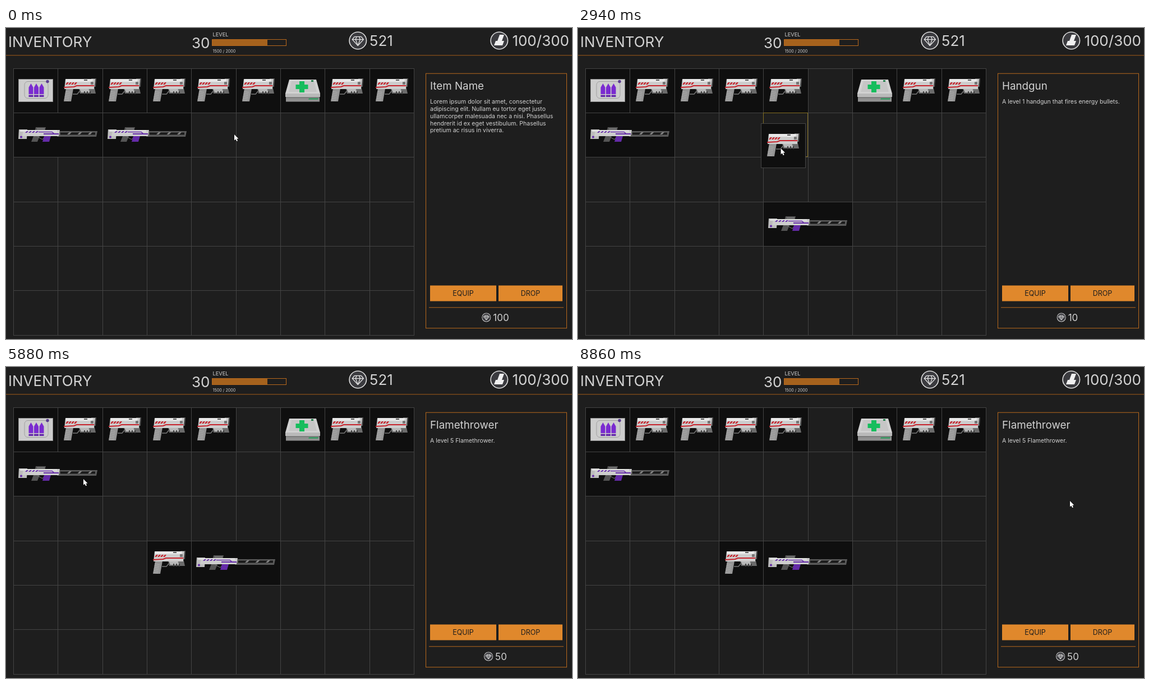
An HTML page with a canvas for the animation above (9.59 s loop, 1009x555 px).

```html
<!DOCTYPE html>
<html lang="en">
<head>
<meta charset="utf-8">
<title>Inventory</title>
<style>
html, body { margin: 0; width: 100%; height: 100%; overflow: hidden; background: #1e1e1e; }
canvas { display: block; width: 1009px; height: 555px; }
</style>
</head>
<body>
<canvas id="stage" width="1009" height="555"></canvas>
<script>
const ctx = document.getElementById('stage').getContext('2d');
const LOOP = 9590, CELL = 79.33, LEFT = 13, TOP = 71.7, COLS = 9, ROWS = 6;
const DRAG_LAG = 12;
const BG = '#1e1e1e', LINE = '#444444', TEXT = '#d2d2d2', ORANGE = '#e0882c', RIM = '#b8691c';
const RED = '#c6232c', PURPLE = '#642ba8', METAL = '#cdcdcd', DARK = '#555555';
const colX = c => Math.round(LEFT + c * CELL);
const rowY = r => Math.round(TOP + r * CELL);

// Each pointer move eases out (power) to a point along a bowed line.
const origin = { x: 407, y: 190 };
const moves = [
  { from: 10, to: 240, x: 266, y: 194, bow: 8, power: 1.5 },
  { from: 1070, to: 1700, x: 407, y: 347, bow: 23, power: 2 },
  { from: 2200, to: 2500, x: 449, y: 118, bow: 0, power: 2 },
  { from: 2740, to: 3300, x: 291, y: 333, bow: 13, power: 1.5 },
  { from: 3680, to: 4150, x: 129, y: 196, bow: 0, power: 2 },
  { from: 4340, to: 5240, x: 244, y: 344, bow: 44, power: 1.7 },
  { from: 5640, to: 5880, x: 138, y: 200, bow: 0, power: 2 },
  { from: 6090, to: 6890, x: 877, y: 239, bow: 60, power: 1.33 }
];

const items = [
  { art: ammo, col: 0, row: 0 },
  ...[1, 2, 3, 4, 7, 8].map(col => ({ art: handgun, col, row: 0 })),
  { art: medkit, col: 6, row: 0 },
  { art: handgun, col: 5, row: 0, drags: [{ from: 2750, to: 3530, col: 3, row: 3 }] },
  { art: rifle, col: 2, row: 1, span: 2, drags: [{ from: 1100, to: 2000, col: 4, row: 3 }] },
  { art: rifle, col: 0, row: 1, span: 2, drags: [
    { from: 4370, to: 5440, col: 0, row: 1 }, { from: 6110, to: 7120, col: 0, row: 1 }] }
];

const flamethrower = { name: 'Flamethrower', lines: ['A level 5 Flamethrower.'], price: '50' };
const details = [
  { at: 0, name: 'Item Name', price: '100', lines: [
    'Lorem ipsum dolor sit amet, consectetur', 'adipiscing elit. Nullam eu tortor eget justo',
    'ullamcorper malesuada nec a nisi. Phasellus', 'hendrerit id ex eget vestibulum. Phasellus',
    'pretium ac risus in viverra.'] },
  { at: 900, ...flamethrower },
  { at: 2600, name: 'Handgun', lines: ['A level 1 handgun that fires energy bullets.'], price: '10' },
  { at: 4320, ...flamethrower }
];

function pointer(t) {
  const next = moves.findIndex(m => t < m.to);
  if (next < 0) return moves[moves.length - 1];
  const start = moves[next - 1] || origin, move = moves[next];
  const u = Math.max(0, (t - move.from) / (move.to - move.from));
  const e = 1 - (1 - u) ** move.power;
  const dx = move.x - start.x, dy = move.y - start.y;
  const side = move.bow * Math.sin(Math.PI * e) / Math.hypot(dx, dy);
  return { x: start.x + dx * e - dy * side, y: start.y + dy * e + dx * side };
}

function rect(color, x, y, w, h) { ctx.fillStyle = color; ctx.fillRect(x, y, w, h); }

function frame(color, x, y, w, h) {
  ctx.strokeStyle = color;
  ctx.lineWidth = 1;
  ctx.strokeRect(x + .5, y + .5, w, h);
}

function trace(pts) {
  ctx.beginPath();
  for (let i = 0; i < pts.length; i += 2) ctx.lineTo(pts[i], pts[i + 1]);
}

function poly(color, ...pts) { trace(pts); ctx.fillStyle = color; ctx.fill(); }

function stroke(color, width, ...pts) {
  trace(pts);
  ctx.strokeStyle = color;
  ctx.lineWidth = width;
  ctx.stroke();
}

// Parallelogram whose top edge is shifted sideways by lean
function slab(color, x, y, w, h, lean) {
  poly(color, x + lean, y, x + lean + w, y, x + w, y + h, x, y + h);
}

function disc(color, x, y, r) {
  ctx.beginPath();
  ctx.arc(x, y, r, 0, Math.PI * 2);
  ctx.fillStyle = color;
  ctx.fill();
}

function text(str, x, y, size, color = TEXT, align = 'left') {
  ctx.font = `${size}px Inter, sans-serif`;
  ctx.fillStyle = color;
  ctx.textAlign = align;
  ctx.fillText(str, x, y);
}

function ammo() {
  rect(METAL, 9, 20, 62, 40);
  frame('#8d8d8d', 9, 19, 61, 40);
  ctx.beginPath();
  ctx.roundRect(20, 23.5, 42, 30, 6);
  ctx.strokeStyle = '#a0a0a0';
  ctx.stroke();
  disc('#5b3a91', 61, 23.5, 2.7);
  for (let i = 0; i < 3; i++) {
    const x = 27.5 + i * 9.5;
    poly('#7a2bd0', x, 46, x, 34, x + 4, 27, x + 8, 34, x + 8, 46);
    rect('#6427ab', x, 47.5, 8, 3.5);
  }
}

function handgun() {
  slab('#959595', 11, 36, 13, 23, 4);
  for (let i = 0; i < 6; i++) stroke('#adadad', 1, 14 - i / 2, 41 + i * 3, 23 - i / 2, 43 + i * 3);
  stroke('#777777', 1.5, 27, 46, 35, 46, 39, 41);
  slab('#6b6b6b', 40, 36, 28, 9, -2);
  slab('#b8b8b8', 42, 36, 16, 7, -3);
  for (let i = 0; i < 3; i++) rect('#3d3d3d', 47 + i * 5, 41, 2, 5);
  slab(DARK, 59, 18, 9, 15, 1);
  slab(METAL, 12, 19, 53, 18, 2);
  slab('#e8e8e8', 14, 19, 48, 5, 1);
  rect(DARK, 47, 20, 6, 2);
  rect('#777777', 59, 24, 5, 5);
  stroke(RED, 2.2, 11, 34, 29, 33, 34, 31, 65, 31);
  for (let i = 0; i < 4; i++) slab(RED, 14 + i * 5, 25, 3, 4, 3);
}

function medkit() {
  slab('#919191', 10, 44, 60, 15.5, 0);
  slab('#b9b9b9', 9, 44, 62, 7, 0);
  poly('#d2d2d2', 16, 20, 64, 20, 71, 45, 9, 45);
  poly('#c6c6c6', 20, 23, 60, 23, 65, 42, 15, 42);
  rect('#6c6c6c', 10, 52, 60, 1);
  rect('#17bd5d', 27.5, 29, 22, 8);
  rect('#17bd5d', 34, 23, 9, 20);
  rect('#237f4b', 55, 21, 4, 3);
  slab('#239e58', 50, 53.5, 17, 2, 1);
}

function rifle() {
  slab(DARK, 38, 26, 18, 8, 2);
  rect('#777777', 42, 28, 14, 2);
  slab(DARK, 32, 42, 11, 10, 4);
  stroke('#777777', 1, 43, 43, 52, 48, 56, 43);
  slab(PURPLE, 52, 42, 12, 10, 3);
  slab('#5a5a5a', 78, 33, 70, 10, 2);
  rect('#191919', 84, 35.5, 62, 4);
  for (let i = 0; i < 3; i++) slab('#858585', 96 + i * 18.5, 35, 4, 4, 4);
  slab('#bdbdbd', 9, 30, 15, 17, 1);
  slab(METAL, 16, 31, 65, 11, 2);
  slab('#e0e0e0', 12, 31, 66, 3, 0);
  rect(PURPLE, 54, 37, 27, 2);
  for (let i = 0; i < 4; i++) slab(PURPLE, 21 + i * 6, 33, 3, 3, 3);
  stroke(PURPLE, 1.6, 45, 34.5, 69, 34.5, 73, 38);
  disc(PURPLE, 14, 43.5, 2);
}

function badge(x, y, r) {
  disc('#e2e2e2', x, y, r);
  disc('#3b3b3f', x, y, r * .9);
}

function gem(x, y, r) {
  const width = r < 10 ? 1.8 : 1.3;
  ctx.save();
  ctx.translate(x, y);
  ctx.scale(r / 16, r / 16);
  badge(0, 0, 16);
  for (const edge of [-10, -4, 4, 10]) stroke('#e4e4e4', width, edge * .6, -7, edge, -2, 0, 9);
  stroke('#e4e4e4', width, -6, -7, 6, -7);
  stroke('#e4e4e4', width, -10, -2, 10, -2);
  ctx.restore();
}

function header() {
  text('INVENTORY', 4, 33.5, 26);
  text('30', 331, 36, 26);
  text('LEVEL', 368.5, 15.3, 9.3);
  rect('#a5621d', 367, 21, 99, 11);
  frame(RIM, 367, 20, 132, 11);
  text('1500 / 2000', 368.5, 43.5, 7.2);
  gem(627.3, 22.5, 16);
  text('521', 648, 32, 26);
  badge(879.3, 22.5, 16);
  slab('#f0f0f0', 876, 12, 8, 11, 4);
  slab('#f0f0f0', 870, 23, 15, 8, 3);
  text('100/300', 1004, 32, 26, TEXT, 'right');
  rect('#a35c17', 0, 48.3, 1009, 1);
}

function panel(info) {
  frame(RIM, 748, 80.7, 251, 454.5);
  text(info.name, 756, 109.5, 18.8);
  info.lines.forEach((line, i) => text(line, 756, 135 + i * 12.85, 10.5));
  rect(ORANGE, 756, 459.5, 118, 28);
  rect(ORANGE, 878, 459.5, 114, 28);
  text('EQUIP', 815, 478, 12.5, BG, 'center');
  text('DROP', 935, 478, 12.5, BG, 'center');
  rect(RIM, 754, 498.3, 240, 1);
  ctx.font = '17px Inter, sans-serif';
  const left = 872.5 - (ctx.measureText(info.price).width + 20) / 2;
  gem(left + 8, 516.5, 8);
  text(info.price, left + 20, 522.5, 17);
}

function place(item, t) {
  let { col, row } = item, drag = null;
  for (const d of item.drags || []) {
    if (t >= d.to) ({ col, row } = d);
    else if (t >= d.from) drag = d;
  }
  return { ...item, span: item.span || 1, col, row, drag };
}

function tile({ art }, x, y, w, h) {
  rect('#0f0f0f', x, y, w, h);
  frame(LINE, x, y, w, h);
  ctx.save();
  ctx.translate(x, y);
  art();
  ctx.restore();
}

function highlight(held, x, y, placed) {
  const { span } = held;
  const col = Math.round((x - LEFT) / CELL), row = Math.round((y - TOP) / CELL);
  if (col < 0 || row < 0 || col + span > COLS || row >= ROWS) return;
  const blocked = placed.some(p => p !== held && p.row === row &&
    col < p.col + p.span && p.col < col + span);
  if (blocked) return;
  const left = colX(col), top = rowY(row);
  frame('#836f22', left, top, colX(col + span) - left - 1, rowY(row + 1) - top - 1);
}

function arrow({ x, y }) {
  ctx.save();
  ctx.translate(x, y);
  const shape = [0, 0, 0, 10.5, 2.4, 8.4, 4.2, 12.2, 6, 11.3, 4.3, 7.7, 7.5, 7.5];
  stroke('#111111', 1.4, ...shape, 0, 0);
  poly('#ffffff', ...shape);
  ctx.restore();
}

function draw(t) {
  rect(BG, 0, 0, 1009, 555);
  header();
  for (let c = 0; c <= COLS; c++) rect(LINE, colX(c), rowY(0), 1, rowY(ROWS) - rowY(0) + 1);
  for (let r = 0; r <= ROWS; r++) rect(LINE, colX(0), rowY(r), colX(COLS) - colX(0) + 1, 1);

  const placed = items.map(item => place(item, t));
  for (const p of placed) {
    if (p.drag) continue;
    const x = colX(p.col), y = rowY(p.row);
    tile(p, x, y, colX(p.col + p.span) - x, rowY(p.row + 1) - y);
  }
  panel(details.filter(d => t >= d.at).pop());

  const held = placed.find(p => p.drag);
  if (held) {
    const hand = pointer(t - DRAG_LAG);
    const x = Math.round(hand.x - held.span * CELL / 2), y = Math.round(hand.y - CELL / 2);
    highlight(held, x, y, placed);
    tile(held, x, y, Math.floor(held.span * CELL), Math.floor(CELL));
  }
  arrow(pointer(t));
}

const start = performance.now();
function tick() {
  draw((performance.now() - start) % LOOP);
  requestAnimationFrame(tick);
}
tick();
</script>
</body>
</html>
```
